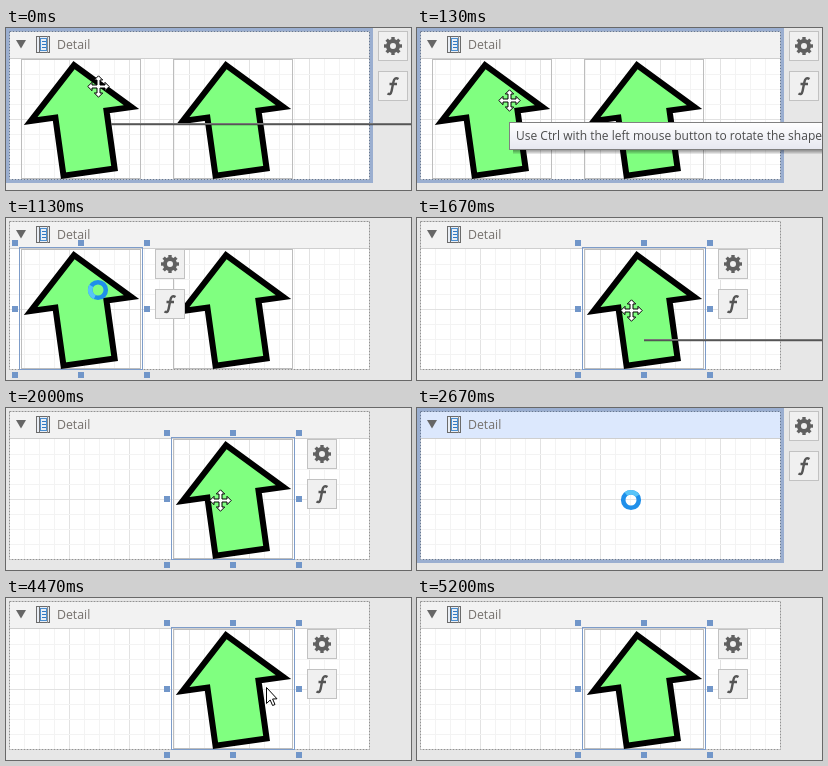
These frames come from a looping animation (405 px wide and 162 px high, 5.94 s). An HTML page with a canvas:

```html
<!DOCTYPE html>
<html lang="en">
<head>
<meta charset="utf-8">
<title>Report band editor</title>
<style>
html, body { margin: 0; width: 100%; height: 100%; overflow: hidden; background: #e7e7e7; }
canvas { display: block; }
</style>
</head>
<body>
<canvas id="stage" width="405" height="162"></canvas>
<script>
const c = document.getElementById('stage').getContext('2d');
const LOOP = 5940;
const FONT = '"Open Sans", "Noto Sans", sans-serif';
const LEFT = 15, RIGHT = 167; // x of the two shape boxes

// [start, scene, cursor, x, y, tooltip: x, y, visible height]
const steps = [
  [0, 'both', 'move', 92, 58, 92, 94, 0],
  [70, 'both', 'move', 92, 66, 92, 94, 14],
  [130, 'both', 'move', 92, 72, 92, 94, 28],
  [470, 'first', 'move', 92, 72],
  [930, 'first', 'busy', 92, 72, , , , 0],
  [1130, 'first', 'busy', 92, 72, , , , 2],
  [1270, 'second', 'busy', 92, 72, , , , 4],
  [1530, 'second', 'arrow', 142, 82],
  [1600, 'second', 'move', 214, 92],
  [1670, 'second', 'move', 214, 92, 214, 120, 0],
  [1730, 'second', 'move', 214, 92, 214, 120, 14],
  [1800, 'second', 'move', 214, 92, 214, 120, 28],
  [2000, 'second', 'move', 214, 92],
  [2330, 'second', 'busy', 214, 92, , , , 0],
  [2530, 'second', 'busy', 214, 92, , , , 2],
  [2670, 'empty', 'busy', 214, 92, , , , 4],
  [3200, 'empty', 'arrow', 243, 88],
  [3270, 'empty', 'arrow', 260, 89],
  [4470, 'second', 'arrow', 260, 89],
  [5000, 'second', 'move', 226, 112],
  [5070, 'second', 'move', 186, 134, 214, 140, 0],
  [5130, 'second', 'arrow', 135, 152],
  [5200, 'second']
];

function rect(x, y, w, h, fill) {
  c.fillStyle = fill;
  c.fillRect(x, y, w, h);
}

function frame(x, y, w, h, color, dash = []) {
  c.strokeStyle = color;
  c.lineWidth = 1;
  c.setLineDash(dash);
  c.strokeRect(x + .5, y + .5, w, h);
  c.setLineDash([]);
}

function poly(points, fill, stroke, width) {
  c.beginPath();
  for (let i = 0; i < points.length; i += 2) c.lineTo(points[i], points[i + 1]);
  c.closePath();
  c.fillStyle = fill;
  c.fill();
  if (!stroke) return;
  c.strokeStyle = stroke;
  c.lineWidth = width;
  c.stroke();
}

function at(x, y, draw) {
  c.save();
  c.translate(x, y);
  draw();
  c.restore();
}

function text(str, x, y, size, color) {
  c.font = `${size}px ${FONT}`;
  c.fillStyle = color;
  c.fillText(str, x, y);
}

function band(selected, tinted) {
  rect(0, 0, 405, 162, '#e7e7e7');
  if (selected) rect(0, 0, 367, 155, '#9aaed0');
  rect(3, 3, 361, 149, '#fff');
  for (let x = 18; x < 363; x += 15) rect(x, 31, 1, 120, (x - 3) % 60 ? '#f3f3f3' : '#e2e2e2');
  for (let y = 46; y < 151; y += 15) rect(4, y, 359, 1, (y - 31) % 60 ? '#f3f3f3' : '#e2e2e2');
  rect(3, 3, 361, 27, tinted ? '#dce8fd' : '#f2f2f2');
  rect(3, 30, 361, 1, '#cfcfcf');
  frame(3, 3, 360, 148, selected ? '#667894' : '#929292', [2, 1]);

  poly([10, 12, 20, 12, 15, 20.5], '#666');
  rect(30, 8, 14, 17, '#6b6b6b');
  rect(31, 9, 12, 15, '#e9eef5');
  rect(33, 8, 1, 17, '#6b6b6b');
  rect(41, 8, 1, 17, '#8b8b8b');
  frame(34, 10, 6, 12, '#4c8fd0');
  for (let y = 13; y < 21; y += 3) rect(36, y, 4, 1, '#2f78c4');
  text('Detail', 51, 21, 12.3, '#75706c');
}

function shape(x) {
  frame(x, 31, 119, 119, '#bdbdbd');
  at(x - 15, 0, () => poly(
    [68, 37.2, 125.4, 79.1, 100.5, 82.5, 108.6, 140.5, 57.5, 147.6, 49.4, 89.6, 24.7, 93],
    '#80ff80', '#000', 6));
}

function selection(x) {
  frame(x - 2, 29, 123, 122, '#7d9cc9');
  for (let i = 0; i < 9; i++)
    if (i !== 4) rect(x - 9 + i % 3 * 66, 22 + Math.floor(i / 3) * 66, 6, 6, '#7196c9');
}

function buttons(x, y, gap) {
  for (const top of [y, y + gap]) {
    rect(x, top, 30, 30, '#f0f0f0');
    frame(x, top, 29, 29, '#c2c2c2');
  }
  at(x + 15, y + 15, () => {
    c.strokeStyle = '#606060';
    c.lineWidth = 4;
    c.beginPath();
    c.arc(0, 0, 5, 0, 7);
    c.stroke();
    for (let i = 0; i < 8; i++) {
      rect(-1.7, -9, 3.4, 3.5, '#606060');
      c.rotate(Math.PI / 4);
    }
  });
  at(x + 15, y + gap + 15, () => {
    c.strokeStyle = '#555';
    c.lineWidth = 2.4;
    c.beginPath();
    c.moveTo(5.5, -7);
    c.bezierCurveTo(2.5, -9, 1, -7, .4, -4);
    c.lineTo(-1.4, 5);
    c.bezierCurveTo(-2, 8, -3.5, 8.8, -5.5, 7.5);
    c.moveTo(-3.5, -2);
    c.lineTo(4, -2);
    c.stroke();
  });
}

function tooltip(x, y, h) {
  if (!h) {
    rect(x + 13, y + 1, 405, 1, '#777');
    rect(x + 13, y + 2, 405, 1, '#555');
    rect(x + 13, y + 3, 405, 1, 'rgba(0,0,0,.15)');
    return;
  }
  for (let i = 4; i > 0; i--) rect(x + 4, y + h, 405, i, 'rgba(0,0,0,.1)');
  const fill = c.createLinearGradient(0, y, 0, y + h);
  fill.addColorStop(0, '#fff');
  fill.addColorStop(1, '#e6e7f0');
  rect(x, y, 405, h, fill);
  frame(x, y, 405, h - 1, '#808080');
  c.save();
  c.beginPath();
  c.rect(x, y + 1, 405, h - 2);
  c.clip();
  // the text slides down with the lower edge
  text('Use Ctrl with the left mouse button to rotate the shape', x + 7, y + h - 10, 12, '#4c4c4c');
  c.restore();
}

const cursors = {
  arrow() {
    poly([.5, .5, .5, 16.5, 4.2, 13, 6.6, 18.5, 9, 17.5, 6.6, 12, 11, 11.8], '#fff', '#000', 1);
  },
  move() {
    const arm = [-1.5, -1.5, -1.5, -6.5, -4.2, -6.5, 0, -10.7, 4.2, -6.5, 1.5, -6.5];
    const points = [];
    for (let k = 0, a = arm; k < 4; k++) {
      points.push(...a);
      a = a.map((v, i) => i % 2 ? a[i - 1] : -a[i + 1]); // quarter turn
    }
    c.translate(.5, .5);
    poly(points, '#fff', '#000', 1);
  },
  busy(turn) {
    c.lineWidth = 4.6;
    c.strokeStyle = '#1f8fea';
    c.beginPath();
    c.arc(0, 0, 7.8, 0, 7);
    c.stroke();
    c.strokeStyle = '#58c4f8';
    c.beginPath();
    c.arc(0, 0, 7.8, turn, turn + 1.7);
    c.stroke();
  }
};

function draw() {
  const t = performance.now() % LOOP;
  const [, scene, cursor, x, y, tipX, tipY, tipH, turn] = steps.findLast(s => s[0] <= t);
  const whole = scene === 'both' || scene === 'empty';

  band(whole, scene === 'empty');
  if (scene === 'both' || scene === 'first') shape(LEFT);
  if (scene !== 'empty') shape(RIGHT);
  if (whole) {
    buttons(372, 3, 40);
  } else {
    const left = scene === 'first' ? LEFT : RIGHT;
    selection(left);
    buttons(left + 134, 31, 40);
  }
  if (tipX !== undefined) tooltip(tipX, tipY, tipH);
  if (cursor) at(x, y, () => cursors[cursor](turn));
  requestAnimationFrame(draw);
}
draw();
</script>
</body>
</html>
```
